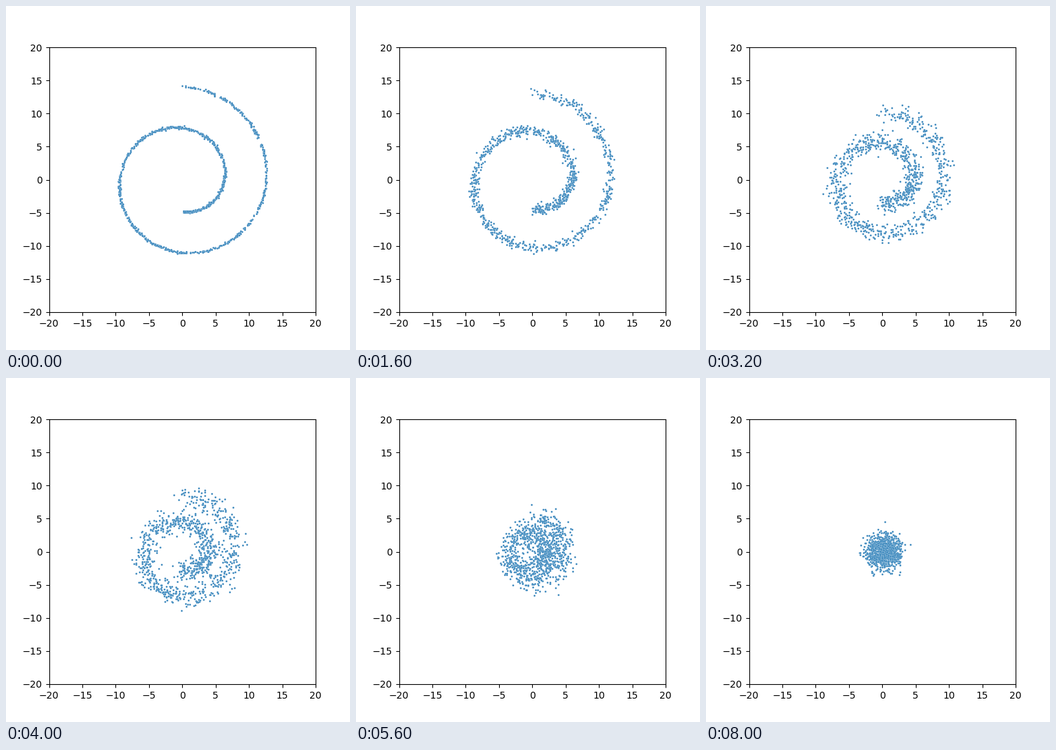
A matplotlib script that plays this animation: 500x500 px, repeating every 8200 ms.

```python
import numpy as np
import matplotlib.pyplot as plt
from matplotlib.animation import FuncAnimation

STEPS = 40
COUNT = 1000
INTERVAL = 200
DOT_SIZE = 4

rng = np.random.RandomState(42)


def swiss_roll(n, noise):
    t = 1.5 * np.pi * (1 + 2 * rng.uniform(size=n))
    roll = np.column_stack([t * np.cos(t), t * np.sin(t)])
    return roll + noise * rng.standard_normal((n, 2))


def diffuse(points, betas):
    """Return every state of the forward noising chain."""
    states = [points]
    for beta in betas:
        noise = rng.standard_normal(points.shape)
        points = np.sqrt(1 - beta) * points + np.sqrt(beta) * noise
        states.append(points)
    return states


states = diffuse(swiss_roll(COUNT, 0.1), np.linspace(1e-4, 0.2, STEPS))

plt.rcParams["font.family"] = "DejaVu Sans"
fig, ax = plt.subplots(figsize=(5, 5), dpi=100)
ax.set(xlim=(-20, 20), ylim=(-20, 20),
       xticks=range(-20, 21, 5), yticks=range(-20, 21, 5))
dots = ax.scatter(*states[0].T, s=DOT_SIZE, color="tab:blue",
                  edgecolors="white", linewidths=0.08 * np.sqrt(DOT_SIZE))


def update(frame):
    dots.set_offsets(states[frame])
    return (dots,)


anim = FuncAnimation(fig, update, frames=len(states), interval=INTERVAL,
                     repeat=True, repeat_delay=0)
plt.show()
```
